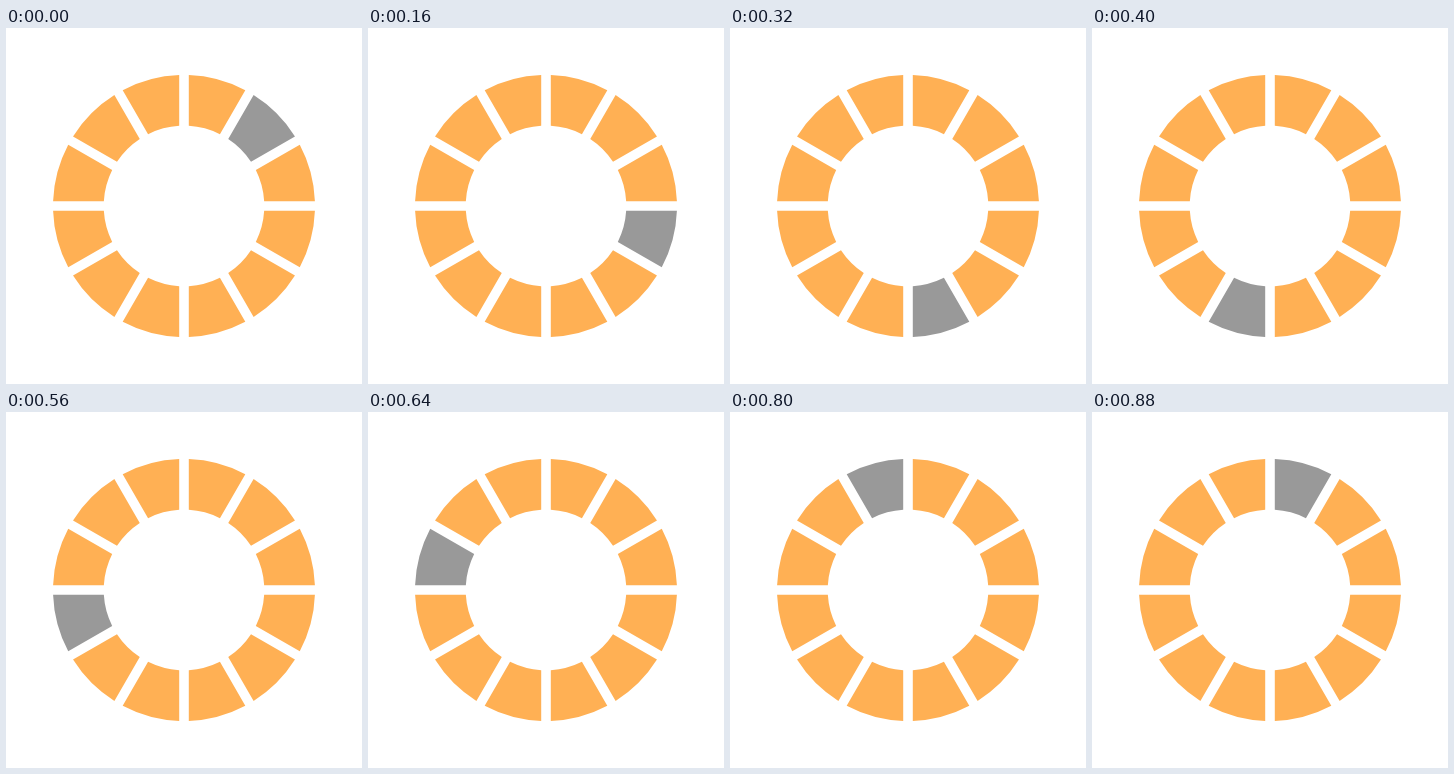
An HTML page with a canvas for the animation above (0.96 s loop, 356x356 px).

```html
<!DOCTYPE html>
<html lang="en">
<head>
<meta charset="utf-8">
<title>Loading ring</title>
<style>
  html, body { margin: 0; width: 100%; height: 100%; overflow: hidden; background: #fff; }
  canvas { display: block; width: 356px; height: 356px; }
</style>
</head>
<body>
<canvas id="stage" width="356" height="356"></canvas>
<script>
const ctx = document.getElementById('stage').getContext('2d');
const SIZE = 356;
const CENTER = 178;
const OUTER = 131;
const INNER = 80.3;
const HALF_GAP = 4.8;
const COUNT = 12;
const STEP_MS = 80;
const SECTOR = 2 * Math.PI / COUNT;

// The inset angle differs per radius so that the gaps have parallel sides.
const outerInset = Math.asin(HALF_GAP / OUTER);
const innerInset = Math.asin(HALF_GAP / INNER);

function drawSegment(index, color) {
  const start = index * SECTOR - Math.PI / 2;
  const end = start + SECTOR;
  ctx.beginPath();
  ctx.arc(CENTER, CENTER, OUTER, start + outerInset, end - outerInset);
  ctx.arc(CENTER, CENTER, INNER, end - innerInset, start + innerInset, true);
  ctx.closePath();
  ctx.fillStyle = color;
  ctx.fill();
}

function draw(time) {
  const active = (Math.floor(time / STEP_MS) + 1) % COUNT;
  ctx.fillStyle = '#fff';
  ctx.fillRect(0, 0, SIZE, SIZE);
  for (let i = 0; i < COUNT; i++) {
    drawSegment(i, i === active ? '#999' : '#ffb054');
  }
}

let startTime;
function tick(now) {
  startTime ??= now;
  draw(now - startTime);
  requestAnimationFrame(tick);
}
draw(0);
requestAnimationFrame(tick);
</script>
</body>
</html>
```
